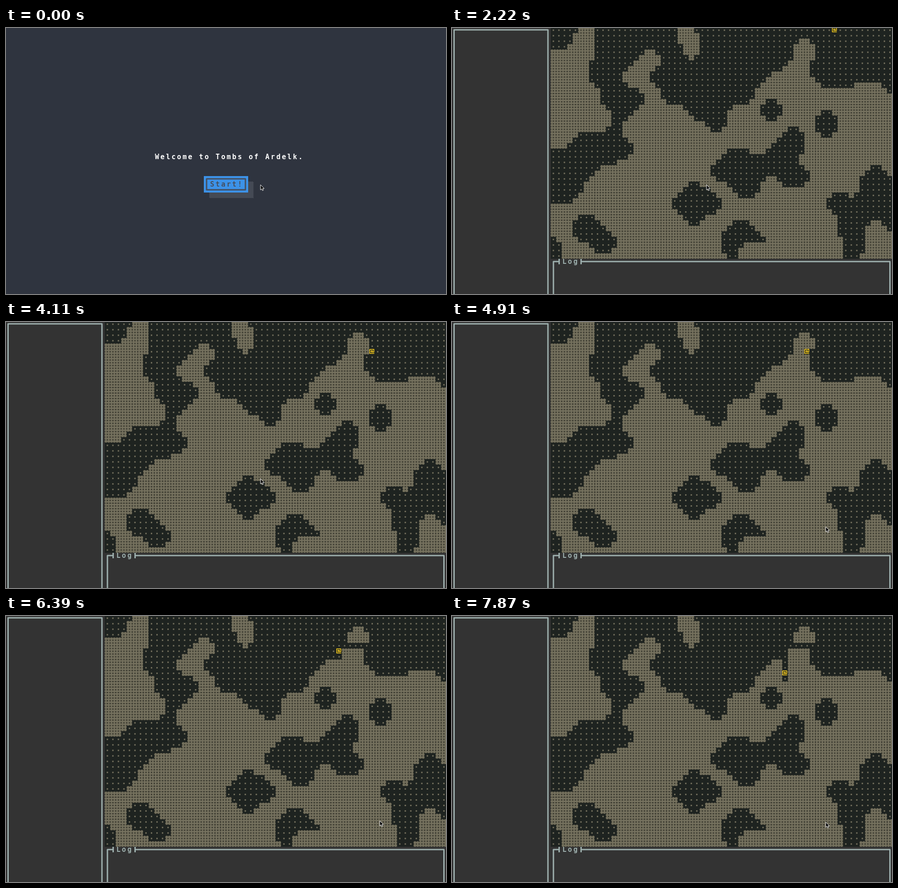
Write an HTML page with a canvas that moves like this. It is 963x582 px and loops after 8 s.

```html
<!DOCTYPE html>
<html lang="en">
<head>
<meta charset="utf-8">
<title>Cave digging</title>
<style>
  html, body { margin: 0; width: 100%; height: 100%; overflow: hidden; background: #2f343f; }
  canvas { display: block; }
</style>
</head>
<body>
<canvas id="stage" width="963" height="582"></canvas>
<script>
const ctx = document.getElementById('stage').getContext('2d');
const LOOP = 8000, GAME_START = 720;
const COLS = 62, ROWS = 42, MAP_COL = 18;
const CELL_W = 12.075, CELL_H = 12.05, PX = CELL_W / 8;
const ROCK = '#3e3d32', FLOOR = '#1e2320', MARK = '#75715e', HERO = '#ffd21c';
const PANEL = '#333333', BORDER = '#9dafad';
const NIGHT = '#2f343f', BLUE = '#3c92e8', INK = '#454e5e';

const cellX = col => col * CELL_W - 1.5;
const cellY = row => row * CELL_H - 1.2;

function rect(color, x, y, w, h) {
  ctx.fillStyle = color;
  ctx.fillRect(x, y, w, h);
}

function fillCell(color, col, row) {
  const x = Math.round(cellX(col)), y = Math.round(cellY(row));
  rect(color, x, y, Math.round(cellX(col + 1)) - x, Math.round(cellY(row + 1)) - y);
}

function write(text, col, row, color) {
  ctx.font = 'bold 15px "DejaVu Sans Mono", monospace';
  ctx.textAlign = 'center';
  ctx.fillStyle = color;
  [...text].forEach((ch, i) => ctx.fillText(ch, cellX(col + i) + 6, cellY(row) + 10.7));
}

// Cave outlines in map cells; a cell is open if its centre lies inside one.
const circle = (x, y, r) => {
  const path = new Path2D();
  path.arc(x, y, r, 0, 7);
  return path;
};
const northCave = `M8.6 -1L7 9 9 11 9 13 11 15 10.4 18 5 19 3 21 -1 22 -1 32 3.2 32 8.8 25 12 24
  15.4 22 13 19 13 17 17.4 12.4 12.8 8.7 17.4 3.6 18.8 3.6 20.2 6 17.8 8.5 20 11 20.8 13 24 14
  26.2 16 29.2 18 31 18.4 32 17 32 15 33 14 36.2 13 37 11 40.2 8 44.2 5 44 3 45.2 1.6 46.8 1.6
  48.4 3.4 46.6 7.5 49.2 10.4 55 10.4 55 9.6 60 9.6 61 11.5 63 11.5 63 -1Z`;
const pillar = 'M23 -1L23 2 25 5.4 26 5.4 27 4 27 1 25.6 -1Z';
const middleCave = `M43.4 17.6L44.7 17.6 46.2 19 46 22 44.6 23.5 47.2 26.4 46 28.4 42.2 28.4
  40.6 26.6 39.4 26.6 38 28.4 37 30.4 34.7 30.4 28.7 25.8 32.2 21.6 35.6 21.6 37.5 22.5 38.6 22.4Z`;
const eastCave = `M58 24.6L59.6 24.6 63 28 63 36.6 62 36.6 60 34.6 58.4 34.6 57 36 56.8 40 56 42
  53.1 42 52 34 50 32 50 31 51 29.6 53 29.6 54.4 30.5 56 29 56 27Z`;
const nook = 'M-1 -1L5.2 -1 3 3.1 -1 3.5Z';
const corner = 'M-1 37.5L1 37.5 2 39 2 42 -1 42Z';
const westHollow = 'M5 33.6L8 33.6 12 38 12 39 11 40.4 8 40.4 7 39 3.8 37 4 35Z';
const diamond = 'M25 27.6L26.8 27.6 31 31 31 32 30 33 28 34 27 35.4 25 35.4 22 32 22 31Z';
const southHollow = 'M33 34.6L35.6 34.6 39 38 39 38.4 35 39 34 40 34 42 32 41.4 31 40 31 37Z';
const caves = [northCave + pillar, middleCave, eastCave, nook, corner, westHollow, diamond, southHollow]
  .map(outline => new Path2D(outline))
  .concat(circle(40, 14.5, 1.8), circle(50, 17, 2.2));

const startMap = Array.from({ length: ROWS }, (_, row) =>
  Array.from({ length: COLS }, (_, col) =>
    caves.some(cave => ctx.isPointInPath(cave, col + 0.5, row + 0.01, 'evenodd'))));

// Bursts of key presses: a step into rock digs it away, onto floor it moves the hero.
const KEY_REPEAT = 145;
const burst = (dx, dy, start, count) =>
  Array.from({ length: count }, (_, i) => ({ dx, dy, time: start + i * KEY_REPEAT }));
const up = (start, count) => burst(0, -1, start, count);
const down = (start, count) => burst(0, 1, start, count);
const left = (start, count) => burst(-1, 0, start, count);
const presses = [
  up(2220, 1), down(2640, 2), down(3080, 1), down(3380, 2),
  left(3820, 5), left(4760, 5), left(5650, 3),
  down(6240, 2), down(6680, 6), down(7720, 2)
].flat();

const pointerStops = [
  { time: 0, x: 557, y: 343 },
  { time: 4400, x: 664, y: 433 },
  { time: 4760, x: 818, y: 448 },
  { time: 7420, x: 818, y: 451 }
];

function gameAt(t) {
  const map = startMap.map(row => row.slice());
  const hero = { col: 51, row: 1 };
  for (const { dx, dy } of presses.filter(p => p.time <= t)) {
    const col = hero.col + dx, row = hero.row + dy;
    if (map[row][col]) Object.assign(hero, { col, row });
    else map[row][col] = true;
  }
  return { map, hero };
}

function drawRock(col, row) {
  const x = cellX(col), y = cellY(row);
  fillCell(ROCK, col, row);
  for (const bar of [1, 5]) {
    rect(MARK, x + bar * PX, y, 2 * PX, CELL_H);
    rect(MARK, x, y + bar * PX, CELL_W, 2 * PX);
  }
}

function drawFloor(col, row) {
  fillCell(FLOOR, col, row);
  rect(MARK, cellX(col) + 3 * PX, cellY(row) + 3 * PX, 2 * PX, 2 * PX);
}

function drawHero(col, row) {
  fillCell(FLOOR, col, row);
  ctx.save();
  ctx.translate(cellX(col), cellY(row));
  ctx.scale(PX, PX);
  ctx.strokeStyle = HERO;
  ctx.lineWidth = 1;
  ctx.lineCap = 'square';
  ctx.stroke(new Path2D('M6.5 6.5H.5V.5H6.5V4.5H2.5V2.5H4.5V4.5'));
  ctx.restore();
}

function drawMap({ map, hero }) {
  map.forEach((line, row) => line.forEach((open, col) =>
    (open ? drawFloor : drawRock)(col + MAP_COL, row)));
  drawHero(hero.col + MAP_COL, hero.row);
}

function drawPanels() {
  rect(PANEL, 0, 0, 963, 582);
  ctx.strokeStyle = BORDER;
  ctx.lineWidth = 3;
  ctx.lineJoin = 'round';
  ctx.stroke(new Path2D('M4.5 590V4H210V590'));
  ctx.stroke(new Path2D('M222 590V511H234M234.5 505V517M282.5 505V517M283 511H958.5V590'));
  write('Log', 20, 42, BORDER);
}

function drawWelcome() {
  rect(NIGHT, 0, 0, 963, 582);
  write('Welcome to Tombs of Ardelk.', 27, 23, '#ffffff');

  const x = 433, y = 324, w = 97, h = 36;
  for (let r = 0; r < 24; r++)
    for (let c = r % 2; c < 64; c += 2)
      rect('#5d626c', x + 12 + c * PX, y + 12 + r * 1.5, PX, 1.5);
  rect(BLUE, x, y, w, h);
  ctx.strokeStyle = INK;
  ctx.lineWidth = 3;
  ctx.lineJoin = 'round';
  ctx.strokeRect(x + 6, y + 6, w - 12, h - 12);
  write('Start!', 37, 28, INK);
}

function drawPointer(t) {
  const { x, y } = pointerStops.filter(stop => stop.time <= t).pop();
  const arrow = new Path2D('M0 0V11.3L2.6 8.9L4.3 12.8L6.2 12L4.6 8.2H8Z');
  ctx.save();
  ctx.translate(x, y);
  ctx.lineJoin = 'miter';
  ctx.lineWidth = 1;
  ctx.strokeStyle = '#ffffff';
  ctx.fillStyle = '#000000';
  ctx.fill(arrow);
  ctx.stroke(arrow);
  ctx.restore();
}

function draw(t) {
  if (t < GAME_START) drawWelcome();
  else {
    drawPanels();
    drawMap(gameAt(t));
  }
  drawPointer(t);
}

// Redraw only when the picture changes.
const changes = [GAME_START, ...[...presses, ...pointerStops].map(p => p.time)];
const startTime = performance.now();
let shown = -1;

function tick() {
  const t = Math.max(0, performance.now() - startTime) % LOOP;
  const step = changes.filter(time => time <= t).length;
  if (step !== shown) {
    shown = step;
    draw(t);
  }
  requestAnimationFrame(tick);
}
tick();
</script>
</body>
</html>
```
